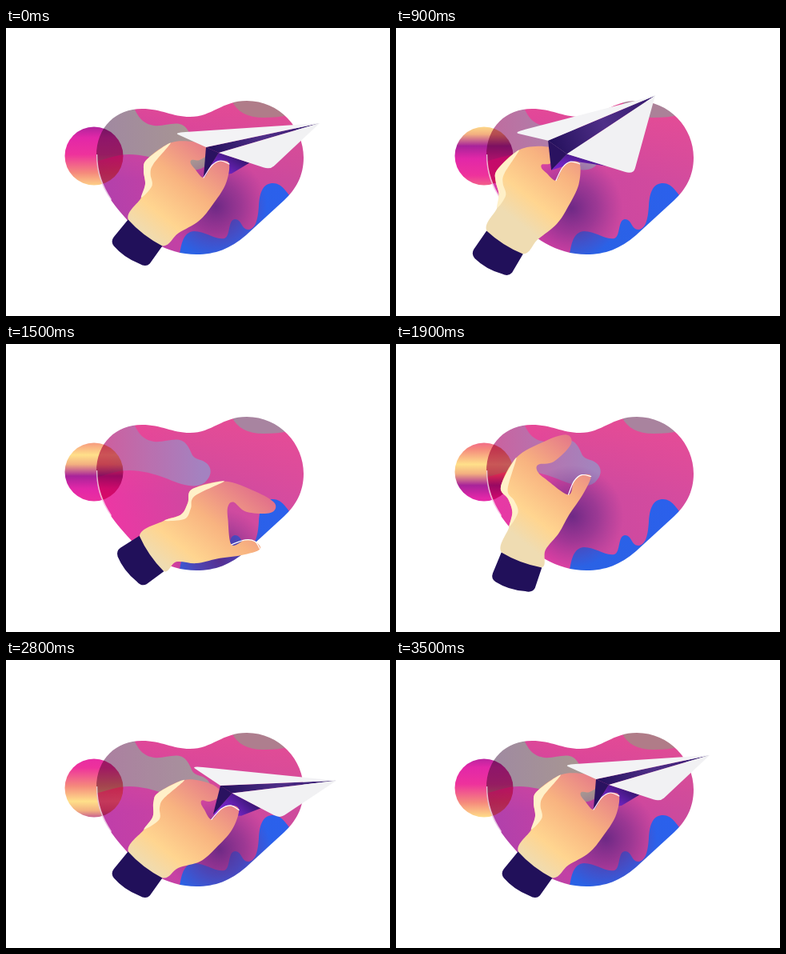
Write an HTML page that moves like this. It is 480 px wide and 360 px high and loops after 3.6 s.

```html
<!DOCTYPE html>
<html lang="en">
<head>
<meta charset="utf-8">
<title>Paper plane</title>
<style>
html, body { margin: 0; width: 100%; height: 100%; overflow: hidden; background: #fff; }
svg { display: block; width: 480px; height: 360px; }
</style>
</head>
<body>
<svg viewBox="0 0 480 360">
  <defs>
    <clipPath id="blobClip"><path d="M113 160C113 123 138 101 170 101C195 101 207 111 230 111C258 111 270 91 301 91C342 91 372 125 372 162C372 185 362 202 348 215L300 259C280 276 262 283 238 283C200 283 170 262 148 236C126 211 113 190 113 160Z"/></clipPath>
    <linearGradient id="ballFill" gradientUnits="userSpaceOnUse" x1="0" y1="95" x2="0" y2="200" spreadMethod="repeat">
      <stop offset="0" stop-color="#ffe08a"/>
      <stop offset=".11" stop-color="#f3b080"/>
      <stop offset=".25" stop-color="#a8239a"/>
      <stop offset=".4" stop-color="#e227a8"/>
      <stop offset=".6" stop-color="#ee329c"/>
      <stop offset=".82" stop-color="#f58a7c"/>
      <stop offset="1" stop-color="#ffe08a"/>
    </linearGradient>
    <linearGradient id="blobFill" gradientUnits="userSpaceOnUse" x1="120" y1="215" x2="365" y2="150">
      <stop offset="0"/><stop offset=".5"/><stop offset="1"/>
    </linearGradient>
    <linearGradient id="topFill" gradientUnits="userSpaceOnUse" x1="0" y1="92" x2="0" y2="190">
      <stop offset="0" stop-color="#f04c90" stop-opacity=".65"/>
      <stop offset="1" stop-color="#f04c90" stop-opacity="0"/>
    </linearGradient>
    <linearGradient id="cloudFill" gradientUnits="userSpaceOnUse" x1="125" y1="0" x2="245" y2="0">
      <stop offset="0"/><stop offset="1"/>
    </linearGradient>
    <linearGradient id="blueFill" gradientUnits="userSpaceOnUse" x1="225" y1="285" x2="350" y2="195">
      <stop offset="0" stop-color="#2a62e4"/>
      <stop offset="1" stop-color="#2b60ec"/>
    </linearGradient>
    <radialGradient id="shadeFill">
      <stop offset="0" stop-color="#5c2480" stop-opacity=".85"/>
      <stop offset=".5" stop-color="#6c2a88" stop-opacity=".5"/>
      <stop offset="1" stop-color="#802f90" stop-opacity="0"/>
    </radialGradient>
    <linearGradient id="handFill" gradientUnits="userSpaceOnUse" x1="172" y1="258" x2="264" y2="142">
      <stop offset="0" stop-color="#efdcb2"/>
      <stop offset=".22" stop-color="#ffd590"/>
      <stop offset=".55" stop-color="#f8b380"/>
      <stop offset="1" stop-color="#e2708a"/>
    </linearGradient>
    <linearGradient id="foldFill" gradientUnits="userSpaceOnUse" x1="0" y1="0" x2="142" y2="-30">
      <stop offset="0" stop-color="#24105c"/>
      <stop offset=".5" stop-color="#4f2f88"/>
      <stop offset="1" stop-color="#33186c"/>
    </linearGradient>
    <linearGradient id="underFill" x1="0" y1="1" x2="1" y2=".2">
      <stop offset="0" stop-color="#8428e0"/>
      <stop offset=".45" stop-color="#6a22b8"/>
      <stop offset="1" stop-color="#2a1260"/>
    </linearGradient>
  </defs>

  <circle cx="110" cy="160" r="36.5" fill="url(#ballFill)"/>
  <g clip-path="url(#blobClip)">
    <rect x="110" y="88" width="265" height="198" fill="url(#blobFill)"/>
    <rect x="110" y="88" width="265" height="198" fill="url(#topFill)"/>
    <path fill="url(#cloudFill)" d="M105 90H156C162 104 166 119 185 122C200 124 216 113 226 126C234 137 230 141 243 145C256 149 259 160 252 169C243 183 222 177 203 169C180 160 160 156 142 159C128 162 118 166 105 168Z"/>
    <path id="cap" d="M280 85Q288 112 322 112Q342 112 352 109V85Z"/>
    <path fill="url(#blueFill)" d="M216 290C219 268 222 255 235 254C250 254 260 265 273 263C281 260 277 240 286 239C295 239 294 252 303 252C313 251 315 237 316 222C317 204 322 194 334 194C345 194 351 206 358 214L310 292Z"/>
    <circle id="shade" r="64" fill="url(#shadeFill)"/>
    <circle cx="110" cy="160" r="36.5" fill="url(#ballFill)" style="mix-blend-mode:multiply"/>
    <path d="M113 158C113 181 120 198 131 215" fill="none" stroke="#fff" stroke-opacity=".7" stroke-width="2.5"/>
  </g>

  <path id="under" fill="url(#underFill)"/>
  <path id="hand" fill="url(#handFill)"/>
  <path id="glow" fill="#fff0c8"/>
  <path id="rim" fill="none" stroke="#fff" stroke-width="1.2" stroke-linecap="round"/>
  <path id="sleeve" fill="#21105a"/>
  <g id="plane">
    <path id="keel" fill="#2a1260"/>
    <path id="fold" fill="url(#foldFill)"/>
    <path id="farWing" fill="#f3f3f5"/>
    <path id="nearWing" fill="#f1f1f3"/>
  </g>
</svg>
<script>
const LOOP = 3600;
const $ = id => document.getElementById(id);
const set = (id, attrs) => {
  for (const k in attrs) $(id).setAttribute(k, attrs[k]);
};
const clamp = (v, lo, hi) => Math.min(hi, Math.max(lo, v));
const mix = (a, b, k) => a.map((v, i) => v + (b[i] - v) * k);
const add = (p, q) => [p[0] + q[0], p[1] + q[1]];
const spin = ([x, y], deg) => {
  const c = Math.cos(deg * Math.PI / 180), s = Math.sin(deg * Math.PI / 180);
  return [x * c - y * s, x * s + y * c];
};
const num = p => p.map(v => v.toFixed(1)).join(' ');
const poly = (...pts) => 'M' + pts.map(num).join('L') + 'Z';

const linear = k => k;
const smooth = k => k * k * (3 - 2 * k);
const easeOut = k => 1 - (1 - k) ** 2;

// Each key is { t, v, ease }, where ease leads to the next key.
const key = (t, v, ease = smooth) => ({ t, v, ease });
function tween(keys, t) {
  const i = keys.findIndex((k, n) => n === keys.length - 2 || t < keys[n + 1].t);
  const a = keys[i], b = keys[i + 1];
  return mix(a.v, b.v, a.ease(clamp((t - a.t) / (b.t - a.t), 0, 1)));
}

// Open hand: left wrist, back, fingers, gap, thumb, right wrist.
const WRIST = [174, 256], CROOK = 13, THUMB = 16, LAST = 21;
const outline = `153,240 169,212 174,195 172,178 166,161 192,129 230,116 259,113 262,126 237,143 217,143
  215,152 225,165 247,187 257,172 268,166 279,170 265,190 243,212 226,232 206,251 194,272`
  .split(/\s+/).map(p => p.split(',').map(Number));

// Wrist x, y, wrist angle, palm angle, finger curl.
const aim = [174, 256, 0, 0, 1];
const reach = [157, 270, -17, -11, 0];
const open = [182, 262, 18, 37, 0];
const handKeys = [
  key(0, aim), key(600, [134, 269, -8, -12, 1]), key(900, [136, 268, -5, -7, 1]),
  key(1300, open), key(1500, open), key(1900, reach), key(2100, [154, 275, -19, -20, .2]),
  key(2400, [154, 264, -20, -27, 1]), key(2800, [174, 256, 0, 9, 1]), key(3500, aim), key(LOOP, aim)
];

// Left fold x, y, angle, roll.
const held = [250, 149, 0, 0];
const caught = [195, 110, 12.6, 0];
const planeKeys = [
  key(0, held), key(600, [183, 142, -26, 1]), key(900, [189, 141, -11, 1], linear),
  key(1000, [298, 117, 6, 0], linear), key(1200, [533, 130, 10, 0], linear),
  key(1201, [-170, 140, 12, 0]), key(1900, [-170, 140, 12, 0], easeOut),
  key(2350, caught), key(2400, caught), key(2800, [268, 157, 9.5, 0]), key(3500, held), key(LOOP, held)
];

// Blob left, middle, right; cloud left, right; cap.
const colors = s => s.split(' ').map(h => [0, 2, 4].map(i => parseInt(h.slice(i, i + 2), 16)));
const muted = colors('b040ac cc42a0 cc4c9c a08aa0 a89890 b07c88');
const vivid = colors('ee36a4 cc4aa0 d84c9e cc60a0 a482c0 a884a0');

// Smooth open curve; a closed one wraps its neighbours.
function curve(pts, closed) {
  const n = pts.length;
  const at = i => closed ? pts[(i + n) % n] : pts[clamp(i, 0, n - 1)];
  let d = 'M' + num(pts[0]);
  for (let i = 0; i < (closed ? n : n - 1); i++) {
    const [a, b, c, e] = [at(i - 1), at(i), at(i + 1), at(i + 2)];
    const c1 = b.map((v, j) => v + (c[j] - a[j]) / 6);
    const c2 = c.map((v, j) => v - (e[j] - b[j]) / 6);
    d += `C${num(c1)} ${num(c2)} ${num(c)}`;
  }
  return closed ? d + 'Z' : d;
}

// Curling draws the fingers towards the thumb crook and swells the heel.
function curled(p, i, curl) {
  if (i < CROOK) return mix(p, outline[CROOK], curl * clamp((i - 3) / 8, 0, .5));
  const swell = i > THUMB ? 16 * curl * Math.sin(Math.PI * (i - THUMB) / (LAST - THUMB)) : 0;
  return add(p, [swell, swell * .6]);
}

function drawHand([x, y, wrist, palm, curl]) {
  const pose = (p, i) => {
    const stiffness = clamp(Math.min(i, LAST - i) / 2, 0, 1);
    const local = curled(p, i, curl);
    const turned = spin([local[0] - WRIST[0], local[1] - WRIST[1]], wrist + (palm - wrist) * stiffness);
    return add(turned, [x, y]);
  };
  const h = outline.map(pose);
  const inset = [4, 3, 2].map(i => mix(h[i], h[18], .1));
  set('hand', { d: curve(h, true) });
  set('handFill', { gradientTransform: `translate(${x} ${y}) rotate(${palm}) translate(${-WRIST})` });
  set('glow', { d: curve([...h.slice(1, 6), ...inset], true) });
  set('rim', { d: curve(h.slice(CROOK, THUMB + 1), false) });
  set('shade', { cx: h[18][0] + 4, cy: h[18][1] + 2 });
  set('sleeve', {
    d: 'M-27 0Q0 5 27 0L28 27Q27 34 18 35Q-2 41 -21 37Q-28 35 -28 28Z',
    transform: `translate(${x} ${y}) rotate(${wrist + 37.5})`
  });
}

function drawPlane([x, y, angle, roll]) {
  const place = { transform: `translate(${x} ${y}) rotate(${angle})` };
  const foldL = [0, 0], nose = [142, -30], tail = [-40, -18], keel = [-3, 37];
  const foldR = [16 + 4 * roll, 7 + 14 * roll];
  const corner = [80 + 17 * roll, 28 + 34 * roll];
  set('plane', place);
  set('under', { ...place, d: poly(foldR, mix(foldR, corner, .6), [32, 33], keel) });
  set('keel', { d: poly(foldL, foldR, keel) });
  set('fold', { d: poly(foldL, nose, foldR) });
  const wing = (root, tip) =>
    `M${num(root)}L${num(nose)}L${num(mix(tip, nose, .08))}Q${num(tip)} ${num(mix(tip, root, .13))}Z`;
  set('farWing', { d: wing(foldL, tail) });
  set('nearWing', { d: wing(foldR, corner) });
}

function paint(t) {
  const k = (1 + Math.cos(2 * Math.PI * (t - 1600) / LOOP)) / 2;
  const css = muted.map((c, i) => `rgb(${mix(c, vivid[i], k).map(Math.round)})`);
  const stops = [...$('blobFill').children, ...$('cloudFill').children];
  stops.forEach((s, i) => s.setAttribute('stop-color', css[i]));
  set('cap', { fill: css[5] });
  set('ballFill', { gradientTransform: `translate(0 ${105 * t / LOOP})` });
}

function render(t) {
  paint(t);
  drawHand(tween(handKeys, t));
  drawPlane(tween(planeKeys, t));
}

const start = performance.now();
function tick() {
  render((performance.now() - start) % LOOP);
  requestAnimationFrame(tick);
}
tick();
</script>
</body>
</html>
```
